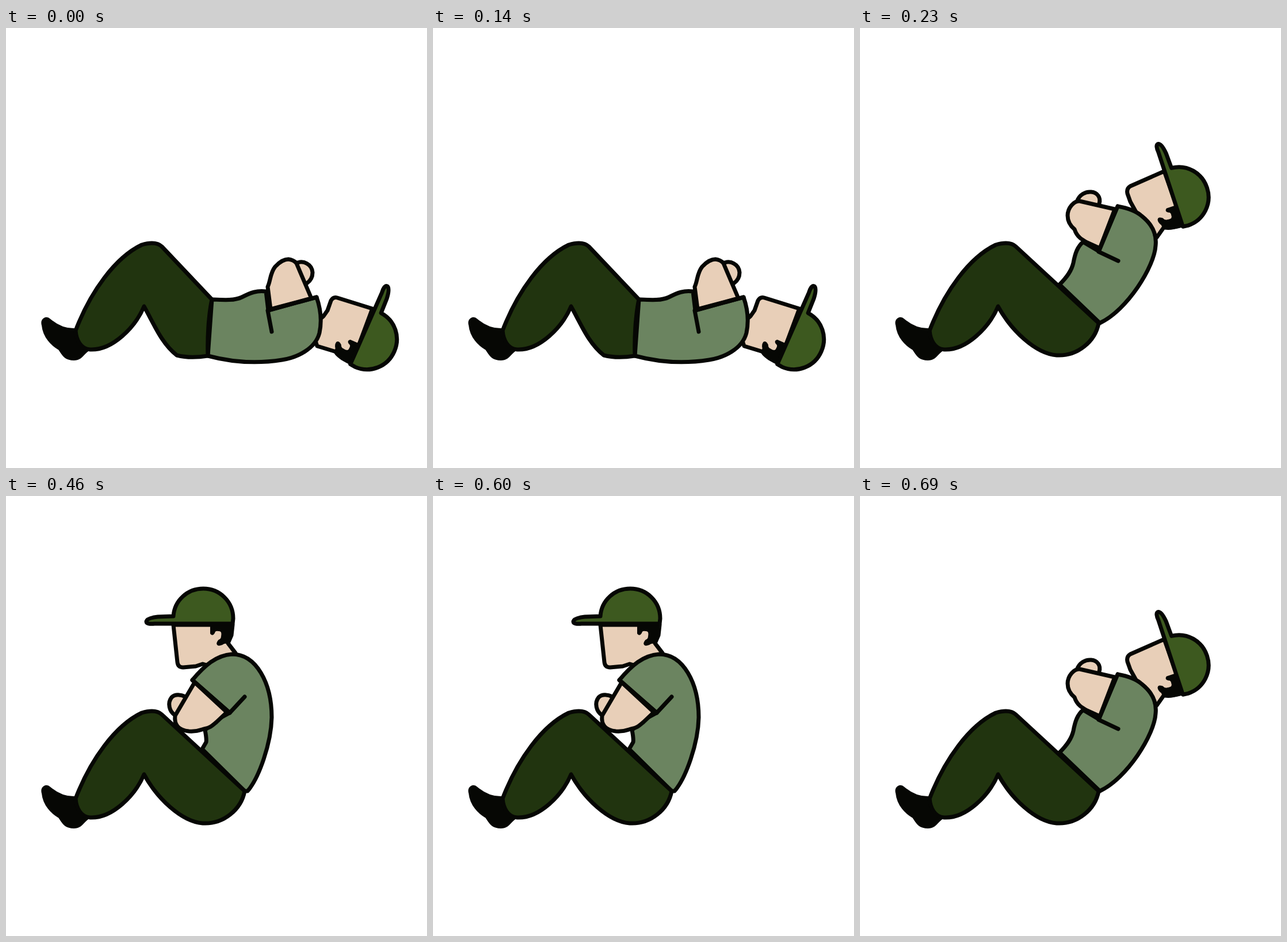
Recreate the animation shown at these times as an HTML page. Size 732 px wide and 765 px high, loop 920 ms.

```html
<!DOCTYPE html>
<html lang="en">
<head>
<meta charset="utf-8">
<title>Sit-ups</title>
<style>
  html, body { margin: 0; width: 100%; height: 100%; overflow: hidden; background: #fff; }
  svg { display: block; width: 100%; height: 100%; }
  path { stroke: #060704; stroke-width: 7; stroke-linecap: round; stroke-linejoin: round; }
  .ink { fill: #060704; }
  .line { fill: none; }
  .skin { fill: #e8cfb8; }
  .shirt { fill: #6b8460; }
  .pants { fill: #21340f; }
  .cap { fill: #3d591f; }
  .pose { visibility: hidden; animation: 920ms step-end infinite; }
  .down { animation-name: down; }
  .mid { animation-name: mid; }
  .up { animation-name: up; }
  @keyframes down { 0% { visibility: visible } 25%, 100% { visibility: hidden } }
  @keyframes mid {
    0%, 50% { visibility: hidden }
    25%, 75% { visibility: visible }
    100% { visibility: hidden }
  }
  @keyframes up { 0%, 75%, 100% { visibility: hidden } 50% { visibility: visible } }
</style>
</head>
<body>
<svg viewBox="0 0 732 765">
  <defs>
    <!-- cap and hair, centred on the crown -->
    <g id="head" transform="translate(-343 -213)">
      <path class="ink" stroke-width="2" style="stroke-width:2" d="M356 224V239Q359 243 362 238Q363 233 369 234Q377 233 375 244Q375 249 370 251Q365 257 369 259Q374 260 379 256L387 255Q393 247 394 224Z"/>
      <path class="cap" d="M291 209C293 181 316 161 343 161C372 161 395 184 395 213L394 222H258C250 223 244 222 244 218C245 213 255 211 264 210Z"/>
    </g>
    <path id="shoe" class="ink" style="stroke-width:2" d="M63 517C60 506 69 500 77 507C90 518 104 524 121 523L146 559C134 565 133 577 118 577C101 577 98 567 92 559C80 552 65 538 63 517Z"/>
    <g id="seat">
      <use href="#shoe"/>
      <path class="pants" d="M121 526C147 458 190 399 236 377Q260 370 271 380L415 513C409 545 378 571 342 569C305 566 263 526 240 484C225 520 185 561 146 559C130 558 122 542 121 526Z"/>
    </g>
  </defs>

  <g class="pose down">
    <use href="#shoe"/>
    <path class="skin" d="M637 488L576 469Q569 467 565 474L559 491L552 501L530 520L541 553L574 563L585 574L602 582Z"/>
    <use href="#head" transform="translate(627.5 541.5) rotate(113.8)"/>
    <path class="shirt" d="M358 472C380 473 398 474 410 468C426 460 436 456 452 458L456 491L540 468C547 488 549 511 545 530C538 558 506 573 480 577C436 584 396 582 351 570Z"/>
    <path class="pants" d="M121 526C147 458 190 399 236 377Q260 370 271 380L358 472C352 500 350 540 351 570Q320 575 297 569C270 548 257 514 240 484C225 520 185 561 146 559C130 558 122 542 121 526Z"/>
    <path class="skin" d="M505 409C517 403 532 411 533 425Q533 437 523 444"/>
    <path class="skin" d="M460 489L455 450C460 440 459 426 468 415C476 406 485 402 491 402Q500 403 505 409L531 470Z"/>
    <path class="line" d="M462 528L455 491L540 468"/>
  </g>

  <g class="pose mid">
    <path class="skin" d="M529 249L470 275Q463 279 465 288L470 302L480 320L500 350L516 364L528 347L545 346L562 342Z"/>
    <use href="#head" transform="translate(554 294) rotate(71.8)"/>
    <path class="shirt" d="M347 446C360 433 368 422 371 408C374 392 378 380 388 372L415 388L448 310C465 313 480 318 490 327C509 342 516 359 514 378C512 415 465 490 417 513Z"/>
    <use href="#seat"/>
    <path class="skin" d="M377 302C381 290 392 284 402 285C413 286 419 295 416 305"/>
    <path class="skin" d="M443 315L382 301C372 300 361 313 361 326C361 338 367 345 373 350C377 363 386 368 395 373L417 383Z"/>
    <path class="line" d="M449 405L415 389L448 310"/>
  </g>

  <g class="pose up">
    <path class="skin" d="M291 224L298 289Q299 298 308 298L330 296L342 292L370 300L399 273L386 256L392 242L394 224Z"/>
    <use href="#head" transform="translate(343 213)"/>
    <path class="shirt" d="M341 440L348 428Q349 422 346 407L365 390L389 377L324 320C345 295 365 277 393 275C435 275 462 325 462 385C461 430 440 490 420 513L415 513Z"/>
    <use href="#seat"/>
    <path class="skin" d="M294 381C284 375 280 360 288 350C294 344 304 345 312 349"/>
    <path class="skin" d="M328 324L294 382C292 398 300 407 318 409C332 410 338 407 344 405C354 404 360 398 366 393L384 376Z"/>
    <path class="line" d="M415 349L389 377L324 320"/>
  </g>
</svg>
</body>
</html>
```
